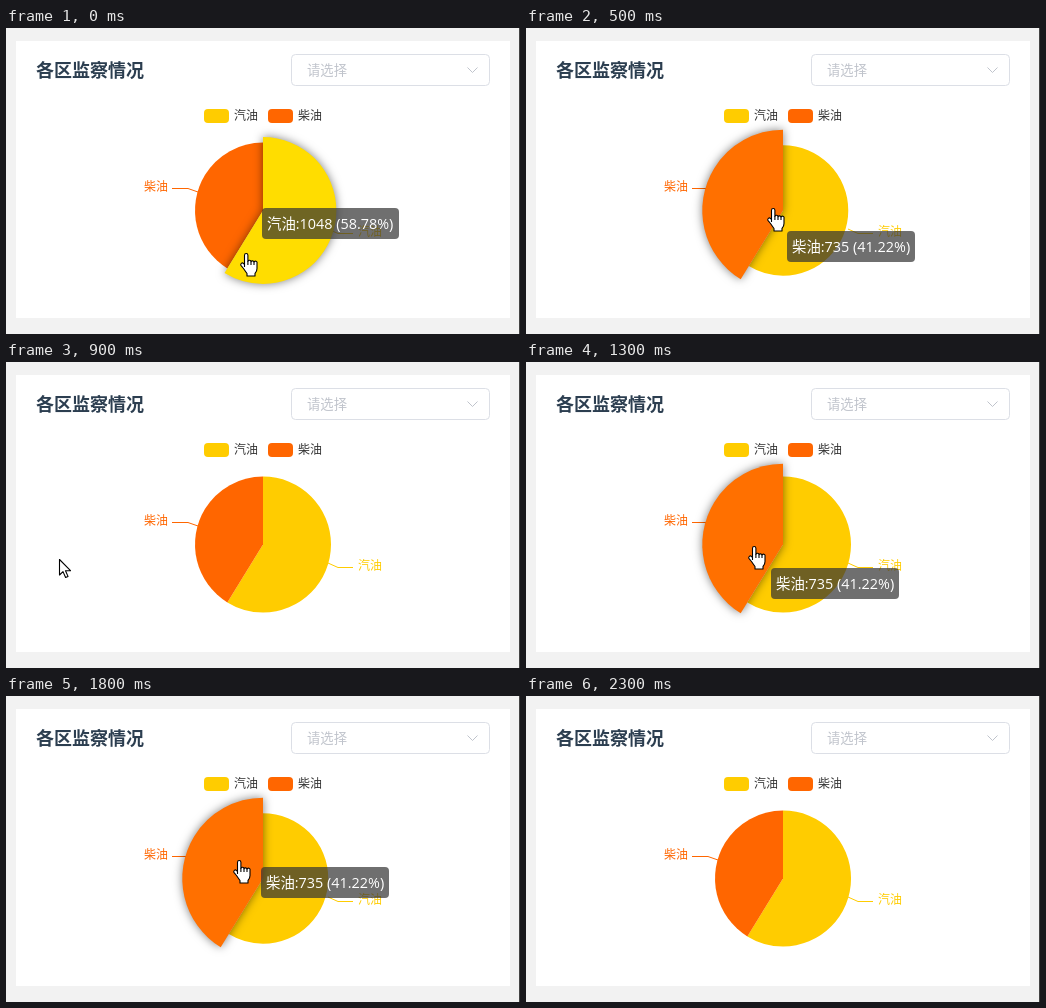
These frames come from a looping animation (514 by 306 pixels, 3000 ms). An HTML page with a canvas:

```html
<!DOCTYPE html>
<html lang="zh">
<head>
<meta charset="utf-8">
<style>
  html, body { margin: 0; width: 514px; height: 306px; overflow: hidden; }
  canvas { display: block; }
</style>
</head>
<body>
<canvas id="stage" width="514" height="306"></canvas>
<script>
const ctx = document.getElementById('stage').getContext('2d');
const CJK = '"Noto Sans CJK SC", "Noto Sans CJK", sans-serif';
const LOOP = 3000, STEP = 100;
const CX = 257, CY = 182.5, RADIUS = 68, GROW = 10, EASE_MS = 300;
const TOP = -Math.PI / 2;
const SPLIT = TOP + Math.PI * 2 * 0.5878;

const slices = [
  { name: '汽油', tip: '汽油:1048 (58.78%)', tipWidth: 137, color: '#fc0', hot: '#fd0',
    from: TOP, to: SPLIT, legendX: 198, labelX: 352, labelY: 208,
    line: [[322, 201], [332, 205], [347, 205]] },
  { name: '柴油', tip: '柴油:735 (41.22%)', tipWidth: 128, color: '#f60', hot: '#ff7000',
    from: SPLIT, to: TOP + Math.PI * 2, legendX: 262, labelX: 138, labelY: 163,
    line: [[192, 164], [182, 160], [166, 160]] }
];

// [time, hovered slice], -1 for none
const hovers = [[-16, 0], [450, 1], [550, -1], [1245, 1], [1370, 0], [1750, 1], [1860, 0], [2060, -1]];

// [time, x, y]
const mouse = [
  [0, 240, 225], [200, 263, 203], [400, 259, 190], [500, 247, 180], [600, 80, 34],
  [700, 62, 48], [900, 53, 197], [1000, 64, 200], [1200, 158, 192], [1300, 228, 184],
  [1400, 285, 180], [1500, 295, 180], [1600, 295, 180], [1700, 245, 150], [1800, 233, 164],
  [1900, 265, 188], [2000, 305, 225], [2100, 385, 272], [2200, 440, 300], [2300, 470, 340]
];
const tips = [
  [0, 256, 180], [100, 267, 207], [200, 276, 223], [300, 277, 221], [500, 261, 203], [600, 254, 198],
  [1300, 245, 206], [1400, 280, 206], [1500, 305, 205], [1600, 315, 200], [1700, 288, 180],
  [1800, 255, 171], [1900, 264, 186], [2000, 292, 217], [2100, 317, 243]
];

const arrow = new Path2D('M.5 .5V16L4 12.6L6.6 18.5L9 17.4L6.5 11.7H11.5Z');
const hand = new Path2D('M4.5 14V2.2a1.7 1.7 0 0 1 3.4 0V8.3a1.6 1.6 0 0 1 3.1 .4a1.6 1.6 0 0 1 3 .6' +
  'a1.5 1.5 0 0 1 3 1V15.5q0 3-2 5V23H7V20.5Q5.5 18.5 3.5 15.5L.9 12.3a1.6 1.6 0 0 1 2.5-1.9L4.5 11.5');
const fingers = new Path2D('M7.9 8V12M11 8.7V12M14 9.3V12');

function along(track, t) {
  const i = track.findIndex(p => p[0] >= t);
  if (i < 0) return track[track.length - 1].slice(1);
  if (i === 0) return track[0].slice(1);
  const [a, b] = [track[i - 1], track[i]];
  const k = (t - a[0]) / (b[0] - a[0]);
  return [a[1] + (b[1] - a[1]) * k, a[2] + (b[2] - a[2]) * k];
}

function elastic(k) {
  if (k >= 1) return 1;
  return 1 + 2 ** (-10 * k) * Math.sin((k - 0.1) * Math.PI * 5);
}

function hoverAt(t) {
  const past = hovers.filter(h => h[0] <= t);
  const [start, now] = past[past.length - 1];
  const before = past.length > 1 ? past[past.length - 2][1] : -1;
  return { now, before, k: elastic((t - start) / EASE_MS) };
}

function text(str, x, y, font, color) {
  ctx.font = font;
  ctx.fillStyle = color;
  ctx.fillText(str, x, y);
}

function box(x, y, w, h, r, color) {
  ctx.beginPath();
  ctx.roundRect(x, y, w, h, r);
  ctx.fillStyle = color;
  ctx.fill();
}

function polyline(points, color) {
  ctx.beginPath();
  points.forEach(([x, y]) => ctx.lineTo(x, y));
  ctx.strokeStyle = color;
  ctx.lineWidth = 1;
  ctx.stroke();
}

function drawPage() {
  box(0, 0, 514, 306, 0, '#f2f2f2');
  box(10, 13, 494, 277, 0, '#fff');
  box(513, 0, 1, 306, 0, '#444');
  text('各区监察情况', 30, 48.5, 'bold 18px ' + CJK, '#2c3e50');
  ctx.beginPath();
  ctx.roundRect(285.5, 26.5, 198, 31, 4);
  ctx.strokeStyle = '#dcdfe6';
  ctx.lineWidth = 1;
  ctx.stroke();
  text('请选择', 301, 47, '13.33px ' + CJK, '#c0c4cc');
  polyline([[461.5, 39.5], [466.5, 44.5], [471.5, 39.5]], '#c0c4cc');
  for (const s of slices) {
    box(s.legendX, 81, 25, 14, 4, s.color);
    text(s.name, s.legendX + 30, 91.5, '12px ' + CJK, '#333');
  }
}

function drawSlice(s, amount, active) {
  ctx.save();
  if (active) {
    ctx.shadowColor = 'rgba(0,0,0,.5)';
    ctx.shadowBlur = 10;
  }
  ctx.beginPath();
  ctx.moveTo(CX, CY);
  ctx.arc(CX, CY, RADIUS + GROW * amount, s.from, s.to);
  ctx.closePath();
  ctx.fillStyle = active ? s.hot : s.color;
  ctx.fill();
  ctx.restore();
}

function drawPie(hover) {
  for (const s of slices) {
    polyline(s.line.map(([x, y]) => [x, y + 0.5 * (y % 5 === 0)]), s.color);
    text(s.name, s.labelX, s.labelY, '12px ' + CJK, s.color);
  }
  const order = hover.now === 0 ? [1, 0] : [0, 1];
  for (const i of order) {
    const active = i === hover.now;
    const amount = active ? hover.k : i === hover.before ? 1 - hover.k : 0;
    drawSlice(slices[i], amount, active);
  }
}

function drawTip(t, hover) {
  if (t > 600 && t < 1300 || t > 2100) return;
  const s = slices[hover.now < 0 ? hover.before : hover.now];
  const [x, y] = along(tips, t).map(Math.round);
  box(x, y, s.tipWidth, 31, 4, 'rgba(50,50,50,.7)');
  text(s.tip, x + 5, y + 20.5, '14.4px "Open Sans", ' + CJK, '#fff');
}

function drawMouse(t, hover) {
  const [x, y] = along(mouse, t).map(Math.round);
  const onSlice = hover.now >= 0;
  ctx.save();
  ctx.translate(onSlice ? x - 6 : x, y);
  ctx.fillStyle = '#fff';
  ctx.strokeStyle = '#000';
  ctx.lineWidth = 1.1;
  ctx.lineJoin = 'round';
  const shape = onSlice ? hand : arrow;
  ctx.fill(shape);
  ctx.stroke(shape);
  if (onSlice) ctx.stroke(fingers);
  ctx.restore();
}

function draw(time) {
  const t = Math.min(2300, Math.floor(time % LOOP / STEP) * STEP);
  const hover = hoverAt(t);
  drawPage();
  drawPie(hover);
  drawTip(t, hover);
  drawMouse(t, hover);
}

const begin = performance.now();
function tick() {
  draw(performance.now() - begin);
  requestAnimationFrame(tick);
}
tick();
</script>
</body>
</html>
```
